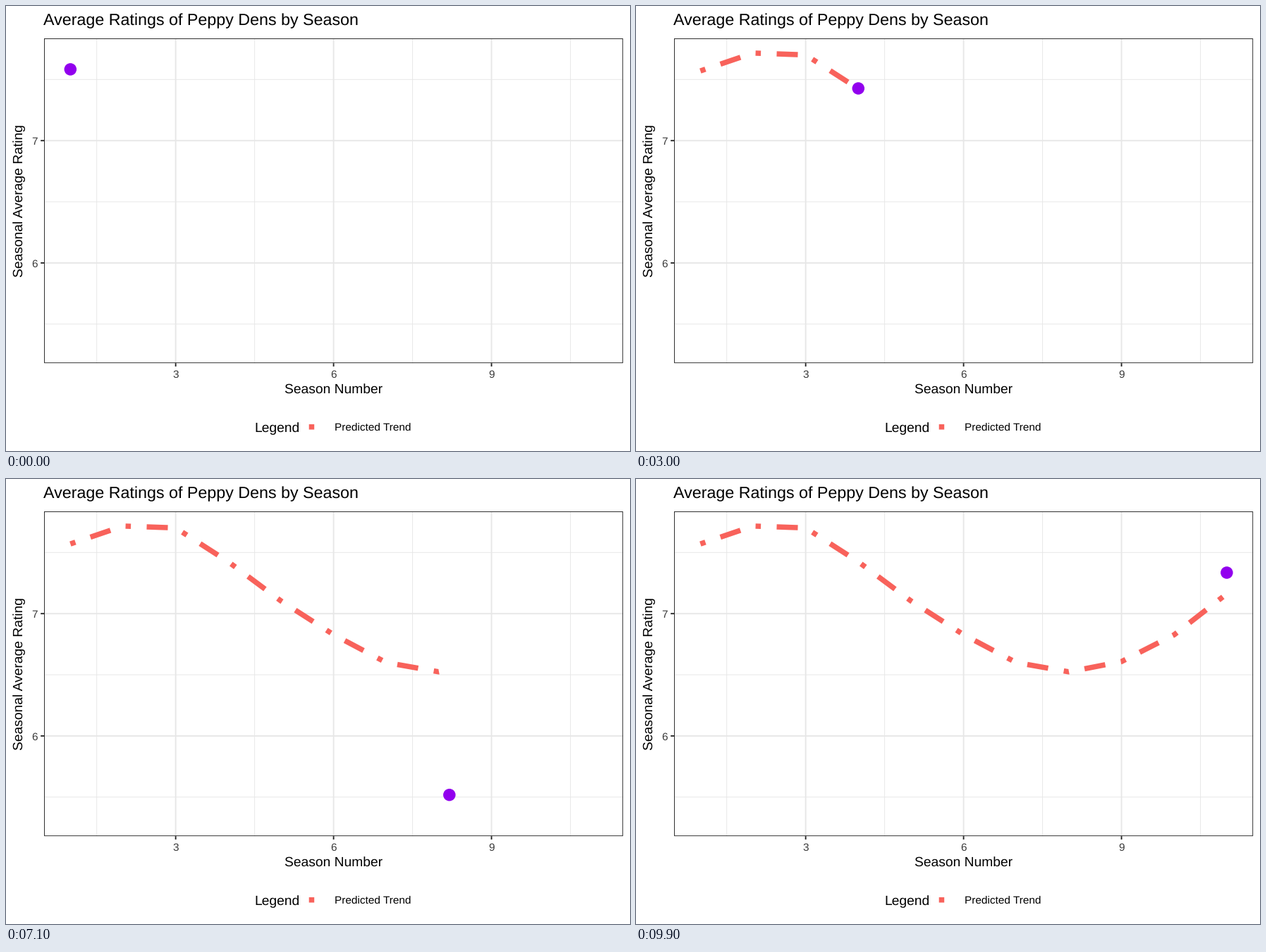
Write a matplotlib script that moves like this. It is 885 px wide and 632 px high and loops after 10000 ms.

```python
import matplotlib.pyplot as plt
import numpy as np
from matplotlib.animation import FuncAnimation
from matplotlib.patches import Circle

W, H, DPI = 885, 632, 100
PX = 72 / DPI  # points per pixel
LEFT, RIGHT, TOP, BOTTOM = 54, 875.2, 46, 507.2

CORAL, PURPLE = "#F8625B", "#9200EE"
GRID, FRAME, TICK_TEXT = "#E7E7E7", "#242424", "#3B3B3B"
TREND_WIDTH = 7.495

SEASONS = np.arange(1, 12)
RATINGS = np.array([7.583, 7.645, 7.702, 7.427, 7.0, 7.018,
                    6.333, 5.297, 6.402, 6.70, 7.335])
TREND = np.array([7.570, 7.716, 7.701, 7.424, 7.104, 6.828,
                  6.600, 6.524, 6.608, 6.827, 7.162])

# Ten steps per season, except a shorter sixth stretch
STEPS = np.array([10] * 5 + [9] + [10] * 4)
KEYS = np.concatenate([[0], np.cumsum(STEPS)])
FRAMES = KEYS[-1] + 1

plt.rcParams.update({
    "font.family": "Liberation Sans",
    "text.hinting": "none",
    "path.simplify": False,
})


def px_x(season):
    return LEFT + (season - 0.5) * (RIGHT - LEFT) / 11


def px_y(rating):
    return 191.2 - (rating - 7) * 173.7


fig = plt.figure(figsize=(W / DPI, H / DPI), dpi=DPI, facecolor="white")
ax = fig.add_axes([0, 0, 1, 1])
ax.set(xlim=(0, W), ylim=(H, 0))
ax.axis("off")


def stroke(x, y, color, width, z=1, **kw):
    return ax.plot(x, y, color=color, lw=width * PX, zorder=z, snap=False,
                   solid_capstyle="butt", **kw)[0]


def label(x, y, text, size, color="black", **kw):
    ax.text(x, y, text, fontsize=size * PX, color=color, va="baseline", **kw)


def draw_panel():
    for s in (1.5, 4.5, 7.5, 10.5):
        stroke([px_x(s)] * 2, [TOP, BOTTOM], GRID, 0.94)
    for r in (5.5, 6.5, 7.5):
        stroke([LEFT, RIGHT], [px_y(r)] * 2, GRID, 0.94)
    for s in (3, 6, 9):
        x = px_x(s)
        stroke([x, x], [TOP, BOTTOM], GRID, 1.87)
        stroke([x, x], [BOTTOM, BOTTOM + 4.8], FRAME, 1.87)
        label(x, 527.5, str(s), 15.45, TICK_TEXT, ha="center")
    for r in (6, 7):
        y = px_y(r)
        stroke([LEFT, RIGHT], [y, y], GRID, 1.87)
        stroke([LEFT - 4.8, LEFT], [y, y], FRAME, 1.87)
        label(45.2, y + 5.6, str(r), 15.45, TICK_TEXT, ha="right")
    l, r, t, b = LEFT + 0.47, RIGHT - 0.47, TOP + 0.47, BOTTOM - 0.47
    stroke([l, r, r, l, l], [t, t, b, b, t], FRAME, 0.94, z=5)


def draw_labels():
    label(53.3, 27.2, "Average Ratings of Peppy Dens by Season", 23.2)
    label(464.6, 549.8, "Season Number", 19.3, ha="center")
    label(23.6, 276.6, "Seasonal Average Rating", 19.3, ha="center",
          rotation=90, rotation_mode="anchor")
    label(352.3, 605.2, "Legend", 19.3)
    label(466.4, 604, "Predicted Trend", 15.45)
    stroke([429.7, 429.7 + TREND_WIDTH], [597.8] * 2, CORAL, TREND_WIDTH)


draw_panel()
draw_labels()
trend = stroke([], [], CORAL, TREND_WIDTH, z=3,
               linestyle=(0, (1, 3, 4, 3)), dash_capstyle="butt")
dot = ax.add_patch(Circle((0, 0), 8.75, fc=PURPLE, ec="none", zorder=4))


def update(i):
    now = np.interp(i, KEYS, SEASONS)
    past = SEASONS < now
    xs = np.append(SEASONS[past], now)
    ys = np.append(TREND[past], np.interp(now, SEASONS, TREND))
    if i == 0:
        trend.set_data([], [])
    else:
        trend.set_data(px_x(xs), px_y(ys))
    dot.center = px_x(now), px_y(np.interp(now, SEASONS, RATINGS))
    return trend, dot


anim = FuncAnimation(fig, update, frames=int(FRAMES), interval=100,
                     repeat=True, repeat_delay=0)
plt.show()
```
